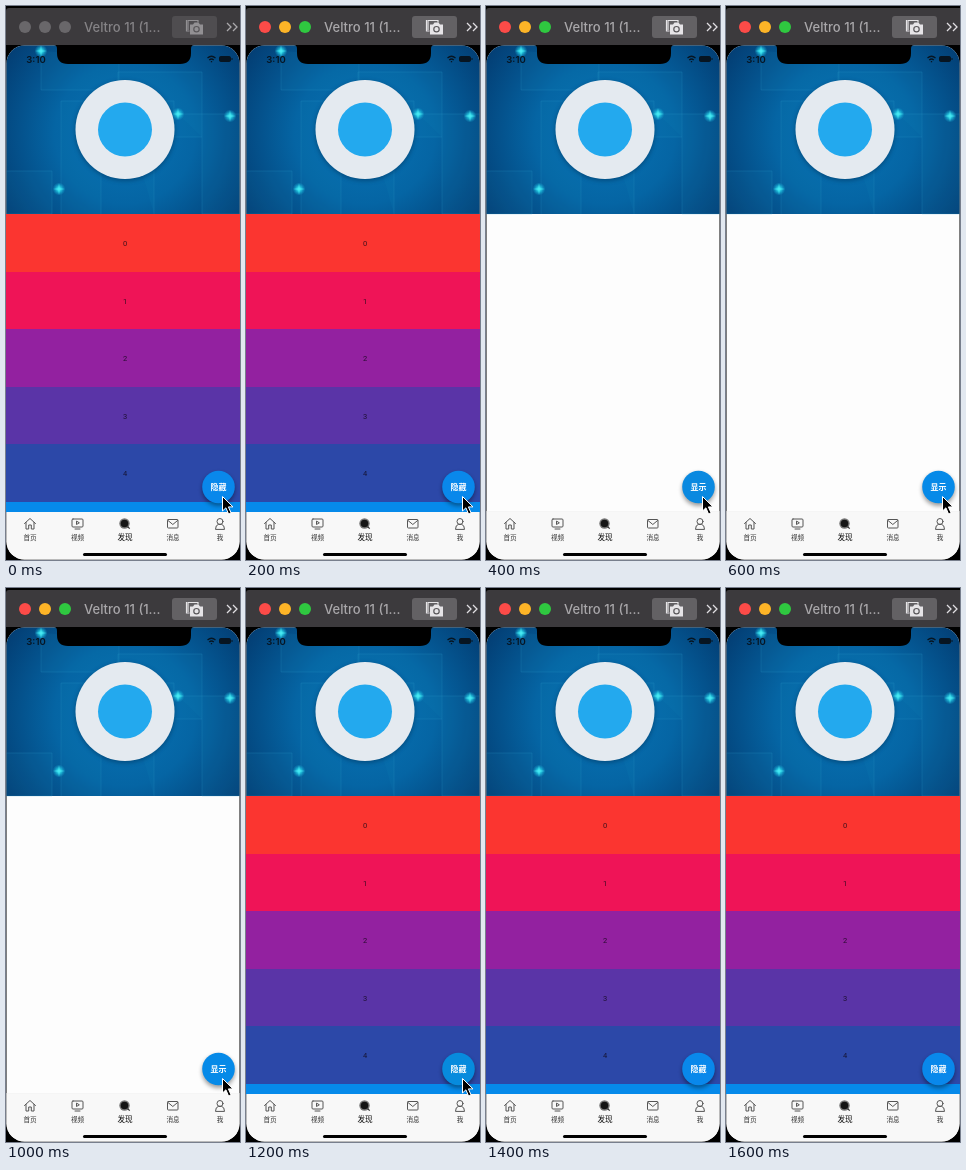
These frames come from a looping animation (234 px wide and 554 px high, 1800 ms). An HTML page:

```html
<!DOCTYPE html>
<html lang="zh-CN">
<head>
<meta charset="utf-8">
<title>Show and hide a list</title>
<style>
  html, body { margin: 0; width: 100%; height: 100%; overflow: hidden; background: #000; }
  svg { display: block; width: 100%; height: 100%; }
  text { text-anchor: middle; font-family: "Noto Sans CJK SC", "Noto Sans CJK", "Noto Sans", sans-serif; }
  .title { font: 500 13px Inter, Roboto, sans-serif; text-anchor: start; }
  .clock { font: 600 9.5px Inter, sans-serif; }
  .row { font: 7.5px Roboto, sans-serif; fill: #100818; fill-opacity: .8; }
  .tab { font-size: 6.6px; fill: #333; }
  .tab.on { font-size: 7.6px; fill: #111; }
  .fab { font-size: 8px; font-weight: 700; fill: #fff; }
  .icon { fill: none; stroke: #555; stroke-width: 1; stroke-linejoin: round; stroke-linecap: round; }

  .blurred, .focused, .listed, .empty, .pointer, .press {
    animation: 1800ms step-end infinite;
  }
  .blurred { animation-name: blurred; }
  .focused { animation-name: focused; }
  .listed { animation-name: listed; }
  .empty { animation-name: empty; }
  .pointer { animation-name: pointer; }
  .press { animation-name: press; }
  @keyframes blurred { 0% { opacity: 1 } 11.111%, 100% { opacity: 0 } }
  @keyframes focused { 0% { opacity: 0 } 11.111%, 100% { opacity: 1 } }
  @keyframes listed { 0% { opacity: 1 } 22.222% { opacity: 0 } 66.666%, 100% { opacity: 1 } }
  @keyframes empty { 0% { opacity: 0 } 22.222% { opacity: 1 } 66.666%, 100% { opacity: 0 } }
  @keyframes pointer { 0% { opacity: 1 } 77.777%, 100% { opacity: 0 } }
  @keyframes press {
    0% { fill: #0988eb } 22.222% { fill: #0a89e0 } 33.333% { fill: #068ae8 }
    66.666% { fill: #078bdd } 77.777%, 100% { fill: #0988eb }
  }
</style>
</head>
<body>
<svg viewBox="0 0 234 554">
  <defs>
    <radialGradient id="sky" gradientUnits="userSpaceOnUse" cx="119" cy="128" r="140">
      <stop offset="0" stop-color="#0873b4"/>
      <stop offset=".5" stop-color="#0565a4"/>
      <stop offset="1" stop-color="#033f75"/>
    </radialGradient>
    <radialGradient id="glow">
      <stop offset="0" stop-color="#5ff6fa"/>
      <stop offset=".35" stop-color="#2bdcec" stop-opacity=".8"/>
      <stop offset="1" stop-color="#12a8d8" stop-opacity="0"/>
    </radialGradient>
    <filter id="soft" x="-30%" y="-30%" width="160%" height="160%"><feGaussianBlur stdDeviation="2"/></filter>
    <filter id="fuzz" x="-30%" y="-30%" width="160%" height="160%"><feGaussianBlur stdDeviation=".7"/></filter>
    <clipPath id="screen"><rect x=".5" y="39.5" width="233" height="514" rx="18"/></clipPath>
    <g id="star">
      <circle r="6.5" fill="url(#glow)"/>
      <path d="M-6 0L0-1 6 0 0 1zM0-6L1 0 0 6-1 0z" fill="#45e8f2" opacity=".7"/>
    </g>
    <g id="camera">
      <path d="M182 24V14.500h10v2" fill="none" stroke="currentColor" stroke-width="1.200"/>
      <path d="M180.500 14v11h3" fill="none" stroke="currentColor" stroke-width="1.200"/>
      <path d="M184 18.500h3l1.500-2h4l1.500 2h3v10h-13z" fill="currentColor"/>
      <circle cx="190.500" cy="23.200" r="2.700" fill="none" stroke="#59575a" stroke-width="1.200"/>
    </g>
  </defs>

  <rect width="234" height="554"/>
  <path d="M0 39V5q0-3 3-3H234V39z" fill="#3c3a3d"/>
  <g class="blurred">
    <g fill="#69676a"><circle cx="19" cy="21" r="6"/><circle cx="39" cy="21" r="6"/><circle cx="59" cy="21" r="6"/></g>
    <text class="title" x="78" y="25.500" fill="#858386">Veltro 11 (1...</text>
    <rect x="166" y="10" width="45" height="22" rx="3" fill="#4f4d50"/>
    <use href="#camera" color="#929093"/>
    <path d="M221 17l4 4-4 4M227 17l4 4-4 4" fill="none" stroke="#aaa8ab" stroke-width="1.300"/>
  </g>
  <g class="focused">
    <circle cx="19" cy="21" r="6" fill="#fc4b48"/>
    <circle cx="39" cy="21" r="6" fill="#fdb427"/>
    <circle cx="59" cy="21" r="6" fill="#2fc840"/>
    <text class="title" x="78" y="25.500" fill="#a9a7aa">Veltro 11 (1...</text>
    <rect x="166" y="10" width="45" height="22" rx="3" fill="#636164"/>
    <use href="#camera" color="#e6e4e7"/>
    <path d="M221 17l4 4-4 4M227 17l4 4-4 4" fill="none" stroke="#e0dee1" stroke-width="1.300"/>
  </g>

  <g clip-path="url(#screen)">
    <rect y="39" width="234" height="515" fill="#fdfdfd"/>
    <rect y="39" width="234" height="169" fill="url(#sky)"/>
    <g fill="#1c86bd" fill-opacity=".1" stroke="#2e9ccb" stroke-opacity=".28" stroke-width=".8">
      <path d="M35 45V84H113V50"/>
      <path d="M55 208V95H168V131H95V208"/>
      <path d="M0 165H46V208H0z"/>
      <path d="M112 80V66H196V131H148V208"/>
      <path d="M172 108H234V208H196V131"/>
    </g>
    <use href="#star" x="35" y="45"/>
    <use href="#star" x="172" y="108"/>
    <use href="#star" x="224" y="110"/>
    <use href="#star" x="53" y="183"/>
    <circle cx="119" cy="125" r="50" fill="#02365f" opacity=".55" filter="url(#soft)"/>
    <circle cx="119" cy="123.500" r="49.500" fill="#e4eaf0"/>
    <circle cx="119" cy="123.500" r="27" fill="#23a9ee"/>

    <g class="listed">
      <g id="rows"></g>
      <rect y="496" width="234" height="10.500" fill="#068aea"/>
    </g>

    <circle cx="212.500" cy="483.500" r="16.500" opacity=".38" filter="url(#soft)"/>
    <circle class="press" cx="212.500" cy="481" r="16.300" fill="#0988eb"/>
    <text class="fab listed" x="212.500" y="484">隐藏</text>
    <text class="fab empty" x="212.500" y="484">显示</text>

    <rect y="506" width="234" height="48" fill="#f8f8f8"/>
    <rect class="empty" y="505" width="234" height="1" fill="#f5f5f5"/>
    <g class="icon">
      <path d="M18.500 517.500L24 512.500l5.500 5M20 516.500v6.500h2.700v-4h2.600v4H28v-6.500"/>
      <rect x="66" y="513" width="11" height="8" rx="1"/>
      <path d="M70.500 515.500v3l2.500-1.500zM69 523h5"/>
      <rect x="161.500" y="513.500" width="10.500" height="8.500" rx=".8"/>
      <path d="M162 514.500l4.800 4 4.800-4"/>
      <circle cx="214" cy="515.500" r="3"/>
      <path d="M209.500 523q0-4 3-4.700h3q3 .7 3 4.700z"/>
    </g>
    <circle cx="118.500" cy="517.500" r="5.200" fill="#777" filter="url(#fuzz)"/>
    <circle cx="118.500" cy="517.500" r="3.800" fill="#151515" filter="url(#fuzz)"/>
    <path d="M121.500 520.500l2.200 2.200" stroke="#333" stroke-width="1.200"/>
    <text class="tab" x="24" y="533.500">首页</text>
    <text class="tab" x="71.500" y="533.500">视频</text>
    <text class="tab on" x="119" y="533.500">发现</text>
    <text class="tab" x="167" y="533.500">消息</text>
    <text class="tab" x="214" y="533.500">我</text>
    <rect x="77" y="547" width="84" height="3" rx="1.500"/>
  </g>

  <path d="M48 39q3 0 3 4v4q0 11 11 11H174q11 0 11-11v-4q0-4 3-4z"/>
  <text class="clock" x="30" y="56.500" fill="#071522">3:10</text>
  <g fill="none" stroke="#071522" stroke-width="1.300">
    <path d="M201.500 52q4-3.600 8 0M203.200 54q2.300-2 4.600 0"/>
    <path d="M205.500 55v1.300"/>
    <rect x="213.500" y="50.500" width="11" height="5" rx="1.200" fill="#071522" stroke-width="1"/>
    <path d="M226 52v2" stroke-width="1"/>
  </g>
  <path class="pointer" d="M216.500 490.500v14.500l3.400-3.200 2.700 6.300 2.500-1.100-2.700-6.100h4.600z" fill="#000" stroke="#fff" stroke-width="1"/>
</svg>
<script>
  const colors = ['#fb3530', '#ef1457', '#9321a0', '#5a34a7', '#2c48a8'];
  const rowHeight = 57.6;
  document.getElementById('rows').innerHTML = colors.map((color, i) => {
    const y = Math.round(208 + i * rowHeight);
    const end = Math.round(208 + (i + 1) * rowHeight);
    return `<rect y="${y}" width="234" height="${end - y}" fill="${color}"/>
      <text class="row" x="119" y="${y + 31.5}">${i}</text>`;
  }).join('');
</script>
</body>
</html>
```
